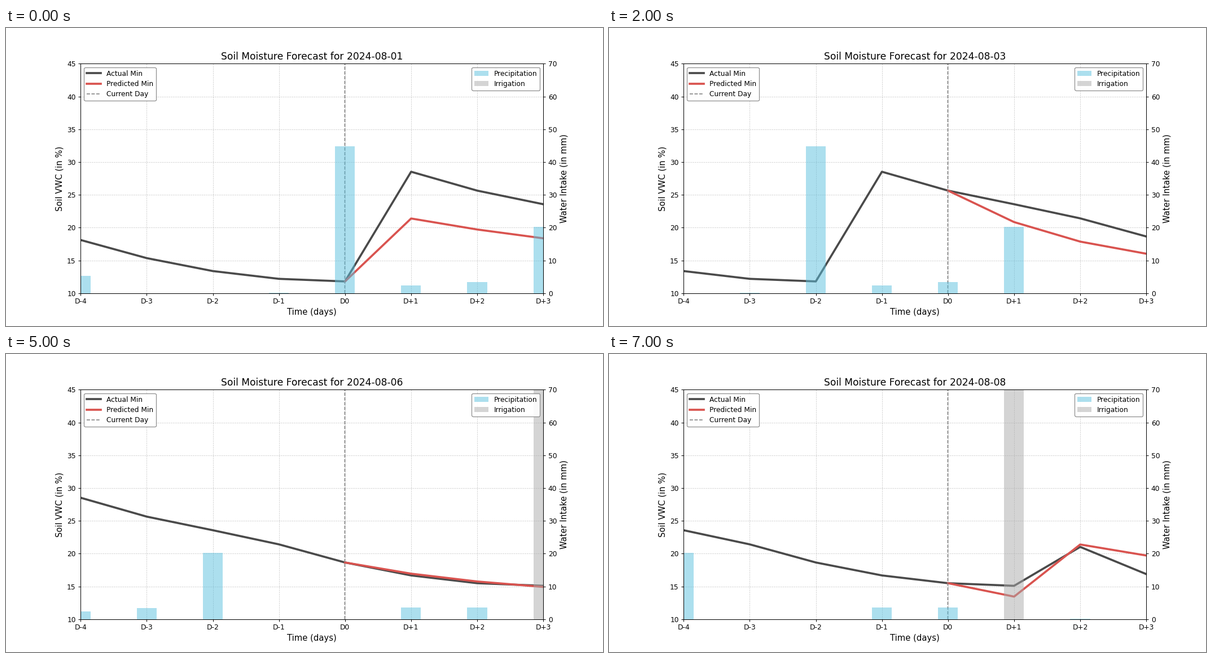
Animation of 1058x529 px, one loop 8000 ms. Source, as a matplotlib script:

```python
import matplotlib.pyplot as plt
import numpy as np
from matplotlib.animation import FuncAnimation

DPI = 88.1666667  # 12 x 6 inches -> 1058 x 529 pixels
OFFSETS = np.arange(-4, 4)
FRAMES = 8

# Water events in mm, keyed by days since the first forecast
RAIN = {-4: 5.3, -1: 0.15, 0: 44.9, 1: 2.4, 2: 3.4, 3: 20.2, 6: 3.65, 7: 3.65, 9: 0.15}
IRRIGATION = {8: 80}
HEAVY = 40      # mm that refill the soil by the next day
REFILLED = 21.4
DRY = 13


def excess(days_left):
    """Moisture above the low point, a number of days before reaching it."""
    if days_left <= 4:
        return 0.395 * days_left ** 2
    return np.interp(days_left, [4, 6, 7], [6.4, 10.55, 13.43])


def actual(day):
    if day <= 0:
        return 11.8 + excess(-day)
    if day <= 8:
        return 15.1 + excess(8 - day)
    return 21.03 - 4.15 * (day - 9)


def forecast(day):
    """Today's moisture and the next three days, decaying towards DRY."""
    values = [actual(day)]
    rate = np.interp(values[0], [16.7, 18.7, 25.7], [0.82, 0.29, 0.38])
    for d in range(day, day + 3):
        if max(RAIN.get(d, 0), IRRIGATION.get(d, 0)) > HEAVY:
            values.append(REFILLED)
            rate = 0.2
        else:
            values.append(values[-1] - rate * (values[-1] - DRY))
    return values


plt.rcParams["font.family"] = "DejaVu Sans"
fig, ax = plt.subplots(figsize=(12, 6), dpi=DPI)
water_ax = ax.twinx()

actual_line, = ax.plot([], [], color="#4a4a4a", lw=3, label="Actual Min")
predicted_line, = ax.plot([], [], color="#d9534f", lw=3, label="Predicted Min")
ax.axvline(-0.003, color="gray", ls="--", lw=1.3, snap=False, label="Current Day")
ax.set(xlim=(-4, 3), ylim=(10, 45))
ax.set_xticks(OFFSETS, ["D0" if d == 0 else f"D{d:+d}" for d in OFFSETS])
ax.set_xlabel("Time (days)", fontsize=12)
ax.set_ylabel("Soil VWC (in %)", fontsize=12, labelpad=4.8)
ax.grid(True, ls="--", lw=0.6, alpha=0.7)
title = ax.set_title("", fontsize=14)


def add_bars(color, label):
    return water_ax.bar(OFFSETS, 0, width=0.3, color=color, alpha=0.5, label=label)


rain_bars = add_bars("#5bc0de", "Precipitation")
irrigation_bars = add_bars("#aaaaaa", "Irrigation")
water_ax.set_ylim(0, 70)
water_ax.set_ylabel("Water Intake (in mm)", fontsize=12)

legend_style = dict(fontsize=10, edgecolor="gray", framealpha=0.9, labelspacing=0.44)
ax.legend(loc="upper left", **legend_style)
water_ax.legend(loc="upper right", **legend_style)


def update(today):
    days = today + OFFSETS
    actual_line.set_data(OFFSETS, [actual(d) for d in days])
    predicted_line.set_data(range(4), forecast(today))
    for bars, events in ((rain_bars, RAIN), (irrigation_bars, IRRIGATION)):
        for bar, d in zip(bars, days):
            bar.set_height(events.get(d, 0))
    title.set_text(f"Soil Moisture Forecast for 2024-08-{today + 1:02d}")
    return actual_line, predicted_line, title, *rain_bars, *irrigation_bars


animation = FuncAnimation(fig, update, frames=FRAMES, interval=1000,
                          repeat=True, repeat_delay=0, blit=False)
plt.show()
```
